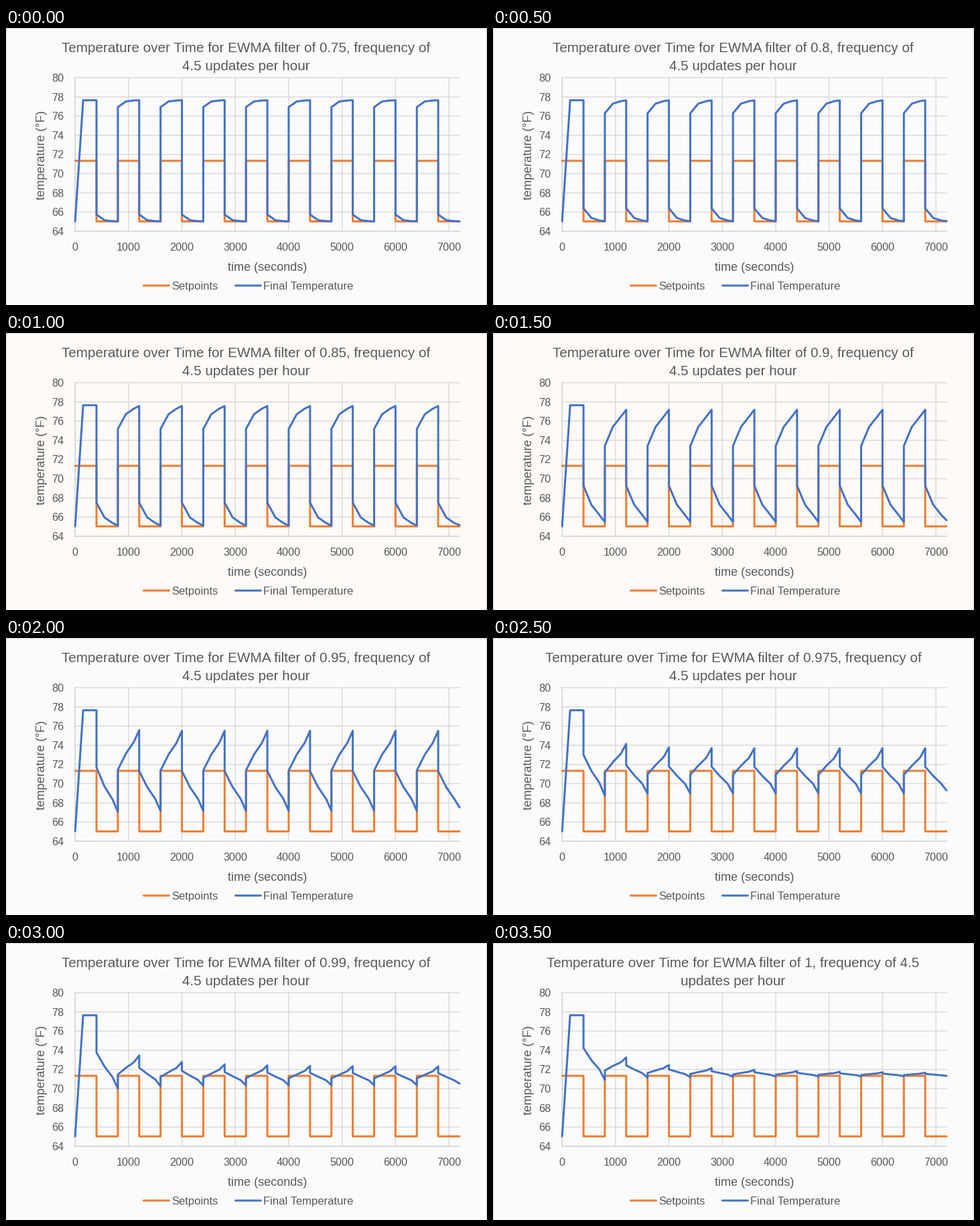
Write a matplotlib script that moves like this. It is 718x413 px and loops after 4 s.

```python
import matplotlib.pyplot as plt
from matplotlib.animation import FuncAnimation

W, H, DPI = 718, 413, 100
PX = 72 / DPI                       # one pixel in points
LOW, HIGH = 65.03, 77.65            # room limits, °F
HALF, END = 400, 7200               # seconds per half cycle, end of run
ORANGE, BLUE = "#ED7D31", "#4472C4"
TEXT, GRID, AXIS = "#595959", "#D9D9D9", "#CFCFCF"
NEUTRAL, WARM = "#FBFBFB", "#FDFAF7"
FILTERS = [0.75, 0.8, 0.85, 0.9, 0.95, 0.975, 0.99, 1]

plt.rcParams["font.family"] = "Liberation Sans"


def px(t):
    return 103.2 + t * 0.0797


def py(temp):
    return 74.1 + (80 - temp) * 14.31


def advance(state, a, x, n):
    """Feed n equal samples into the weighted sum and its total weight."""
    total, weight = state
    gain = sum(a ** k for k in range(n))
    return total * a ** n + x * gain, weight * a ** n + gain


def temperature(a):
    """Times and values of the normalised moving average of the on/off wave."""
    ts, vs = [0, 150, HALF], [0, 1, 1]
    state = advance((0, 0), a, 1, 27)
    for start in range(HALF, END, HALF):
        on = (start // HALF + 1) % 2
        last = 28 if start + HALF == END else 31
        for dt, n in zip((0, 150, 300, HALF), (10, 16, 22, last)):
            total, weight = advance(state, a, on, n)
            ts.append(start + dt)
            vs.append(total / weight)
        state = advance(state, a, on, last)
    return [px(t) for t in ts], [py(LOW + (HIGH - LOW) * v) for v in vs]


def setpoints():
    ts, vs = [], []
    for i in range(END // HALF):
        ts += [i * HALF, (i + 1) * HALF]
        vs += [LOW if i % 2 else (LOW + HIGH) / 2] * 2
    return [px(t) for t in ts], [py(v) for v in vs]


def title_lines(a):
    if a == 1:
        return ("Temperature over Time for EWMA filter of 1, frequency of 4.5",
                "updates per hour")
    return (f"Temperature over Time for EWMA filter of {a:g}, frequency of",
            "4.5 updates per hour")


fig = plt.figure(figsize=(W / DPI, H / DPI), dpi=DPI)
ax = fig.add_axes([0, 0, 1, 1])
ax.set_xlim(0, W)
ax.set_ylim(H, 0)
ax.axis("off")


def line(xs, ys, color, width, **kw):
    return ax.plot(xs, ys, color=color, lw=width * PX, snap=False, **kw)[0]


def label(x, y, s, size, ha="center", va="baseline", **kw):
    return ax.text(x, y, s, fontsize=size * PX, color=TEXT, ha=ha, va=va, **kw)


# border, grid and axis numbers
line([0.5, 0.5, W - 0.5, W - 0.5], [H, 0.5, 0.5, H], GRID, 1.3)
for temp in range(64, 81, 2):
    y = py(temp)
    line([px(0), px(END)], [y, y], AXIS if temp == 64 else GRID, 1.4)
    label(86.5, y + 5.9, str(temp), 16.3, ha="right")
for t in range(0, END, 1000):
    line([px(t)] * 2, [py(80), py(64)], GRID if t else AXIS, 1.4)
    label(px(t), 332, str(t), 16.3)

label(390, 361.5, "time (seconds)", 18)
label(53.5, 189.5, "temperature (°F)", 18.2, va="center", rotation=90)

# legend
for x, color, name in ((205, ORANGE, "Setpoints"),
                       (342, BLUE, "Final Temperature")):
    line([x + 0.5, x + 38.5], [384, 384], color, 3, solid_capstyle="round")
    label(x + 42.5, 390, name, 16.6, ha="left")

style = dict(solid_capstyle="round", solid_joinstyle="round")
line(*setpoints(), ORANGE, 3, **style)
curve = line([], [], BLUE, 3, **style)
titles = [label(358.6, y, "", 20.6) for y in (36.5, 63)]


def update(i):
    a = FILTERS[i]
    fig.patch.set_facecolor(WARM if a in (0.85, 0.9) else NEUTRAL)
    curve.set_data(*temperature(a))
    for text, s in zip(titles, title_lines(a)):
        text.set_text(s)
    return [curve, *titles]


anim = FuncAnimation(fig, update, frames=len(FILTERS), interval=500,
                     repeat=True, repeat_delay=0, blit=False)
plt.show()
```
